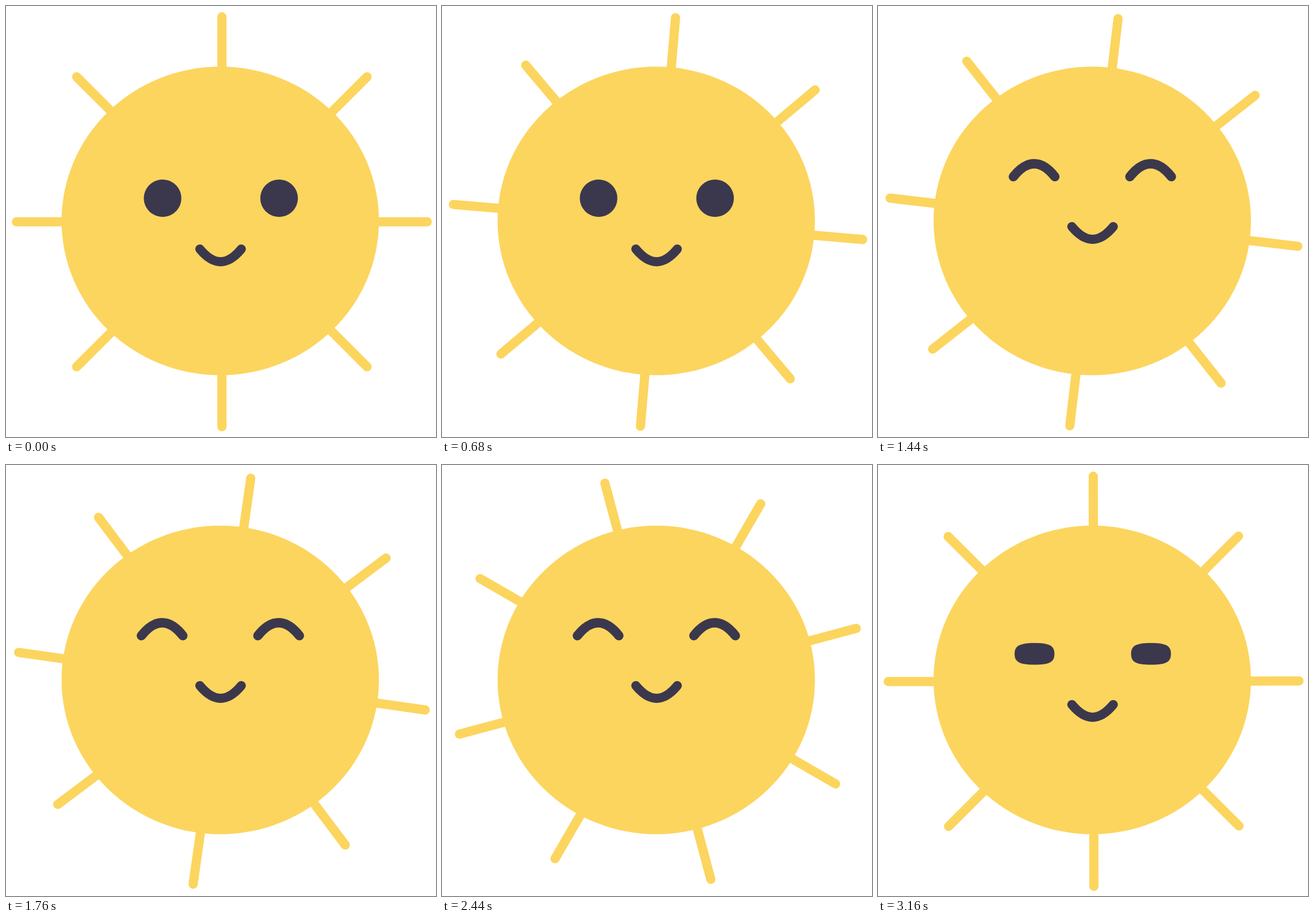
Recreate the animation shown at these times as an HTML page. Size 747 by 750 pixels, loop 3.2 s.

```html
<!DOCTYPE html>
<html lang="en">
<head>
<meta charset="utf-8">
<title>Smiling sun</title>
<style>
  html, body { margin: 0; width: 100%; height: 100%; overflow: hidden; background: #fff; }
  svg { display: block; }
  .line { fill: none; stroke: #3b384d; stroke-linecap: round; }
</style>
</head>
<body>
<svg width="747" height="750" viewBox="0 0 747 750">
  <g id="rays" stroke="#fcd55f" stroke-width="16" stroke-linecap="round"></g>
  <ellipse cx="372.2" cy="374" rx="275.7" ry="268.5" fill="#fcd55f"/>
  <g id="face">
    <path class="eye"/>
    <path class="eye"/>
    <path class="line" stroke-width="16" d="M336.8 423C361 452.3 384.5 452.3 408.7 423"/>
  </g>
</svg>
<script>
const LOOP = 3200, STEP = 40;
const rays = document.getElementById('rays');
const face = document.getElementById('face');
const eyes = document.querySelectorAll('.eye');
const eyeX = [272, 474.4];

for (let a = 0; a < 360; a += 45) {
  rays.insertAdjacentHTML('beforeend',
    `<path d="M0 -240V-356.7" transform="translate(.25 -.4) rotate(${a})"/>`);
}

const mix = (a, b, k) => a + (b - a) * k;
const smooth = p => {
  p = Math.min(1, Math.max(0, p));
  return p * p * (3 - 2 * p);
};

// Cubic easing with handles (x1, 0) and (x2, 1)
function ease(p, x1, x2) {
  let lo = 0, hi = 1;
  for (let i = 0; i < 30; i++) {
    const s = (lo + hi) / 2, r = 1 - s;
    if (3 * x1 * s * r * r + 3 * x2 * s * s * r + s ** 3 < p) lo = s;
    else hi = s;
  }
  return smooth(lo);
}

// Two turns that slow down in the middle
const angle = t => t < 1600
  ? 97.6 * ease(t / 1600, .43, .356)
  : mix(97.6, 180, ease(t / 1600 - 1, .8, .557));

// Round eye that flattens into a soft box
function blob(k) {
  const w = mix(32.6, 34.6, k), h = mix(32.5, 18.8, k);
  const cx = w * mix(.552, .78, k), cy = h * mix(.552, .72, k);
  return `M0 ${-h}C${cx} ${-h} ${w} ${-cy} ${w} 0S${cx} ${h} 0 ${h}` +
    `S${-w} ${cy} ${-w} 0S${-cx} ${-h} 0 ${-h}Z`;
}

// Closed eye that bends upwards
function arc(k) {
  const w = mix(28, 36, k), c = mix(10, 12.5, k), y = -30 * k;
  return `M${-w} 0C${-c} ${y} ${c} ${y} ${w} 0`;
}

function draw(now) {
  const t = Math.floor(now % LOOP / STEP) * STEP;
  const shut = smooth((t - 920) / 160) - smooth((t - 3040) / 160);
  const open = shut < .4;

  rays.setAttribute('transform', `translate(374.75 375.9) rotate(${angle(t)})`);
  face.setAttribute('transform', `translate(0 ${-39 * shut})`);
  eyes.forEach((eye, i) => {
    eye.setAttribute('class', open ? 'eye' : 'eye line');
    eye.setAttribute('fill', '#3b384d');
    eye.setAttribute('stroke-width', mix(28, 16.3, shut));
    eye.setAttribute('d', open ? blob(Math.min(1, shut / .156)) : arc(shut));
    eye.setAttribute('transform',
      `translate(${eyeX[i] - .8 * shut} ${mix(334.5, 336, shut)})`);
  });
  requestAnimationFrame(draw);
}
const start = performance.now();
const tick = draw;
draw = now => tick(Math.max(0, now - start));
draw(start);
</script>
</body>
</html>
```
